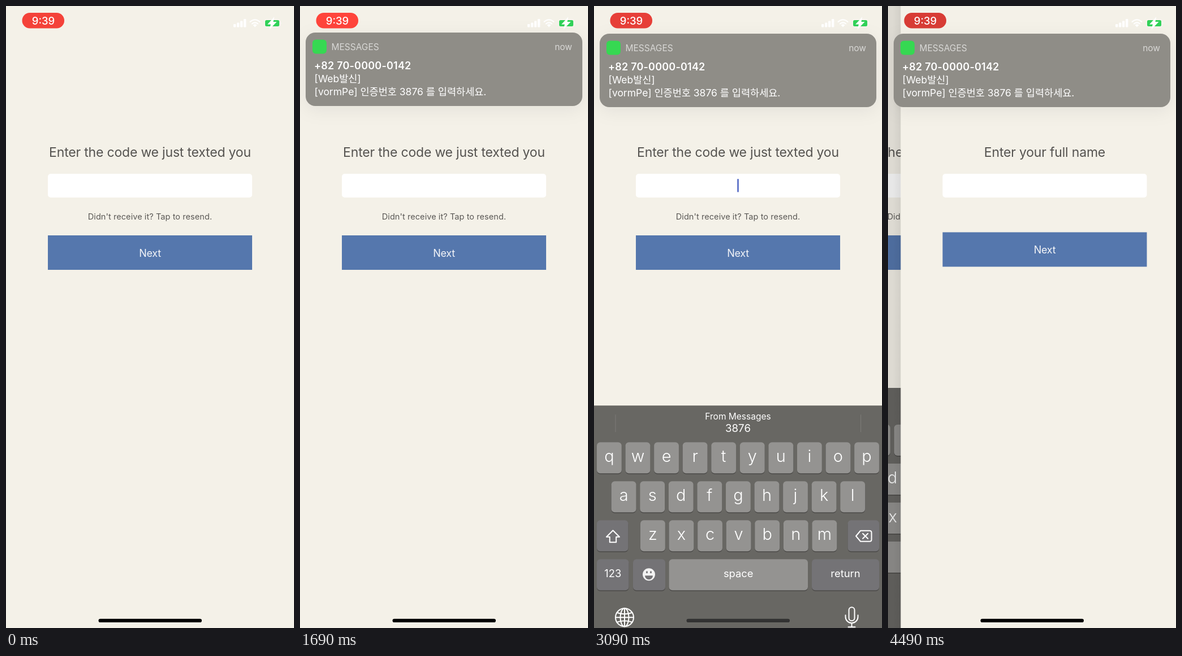
Recreate the animation shown at these times as an HTML page. Size 509x1101 px, loop 4590 ms.

```html
<!DOCTYPE html>
<html lang="en">
<head>
<meta charset="utf-8">
<title>Code entry</title>
<style>
  html, body { margin: 0; width: 100%; height: 100%; overflow: hidden; background: #f4f1e8; }
  svg { display: block; width: 100vw; height: 100vh; }
  text {
    font-family: Inter, "Noto Sans CJK KR", "Noto Sans CJK", sans-serif;
    font-optical-sizing: none;
    fill: #fff;
    white-space: pre;
  }
  .mid { text-anchor: middle; }
  .title { font-size: 23px; letter-spacing: -.19px; fill: #555350; }
  .hint { font-size: 14.5px; letter-spacing: .08px; fill: #5a5855; }
  .button { font-size: 18px; letter-spacing: -.3px; fill: #f4f5f8; }
  .small { font-size: 15.5px; }
  .label { font-size: 18.4px; }
  .letter { font-size: 29px; font-weight: 300; }
  .line { fill: none; stroke: #fff; stroke-width: 2; stroke-linejoin: round; stroke-linecap: round; }
</style>
</head>
<body>
<svg viewBox="0 0 509 1101">
  <defs>
    <filter id="soft" x="-15%" y="-50%" width="130%" height="200%">
      <feDropShadow dx="0" dy="7" stdDeviation="15" flood-color="#000" flood-opacity=".065"/>
    </filter>
    <linearGradient id="edge">
      <stop offset="0" stop-opacity="0"/>
      <stop offset="1" stop-opacity=".05"/>
    </linearGradient>
  </defs>

  <g id="codePage">
    <rect width="509" height="1101" fill="#f4f1e8"/>
    <g id="codeForm"></g>
    <text id="code" class="title mid" x="254.5" y="326">3876</text>
    <rect id="caret" y="306" width="2.6" height="23.5" rx="1" fill="#5268c4"/>
    <g id="keyboard">
      <rect width="509" height="430" fill="#686763"/>
      <g id="suggestion">
        <path id="dividers" d="M38 16v31M471.5 16v31" stroke="#7c7b78"/>
        <rect id="pressed" x="37" y="7" width="435.5" height="48" rx="6" fill="#747376"/>
        <text class="small mid" x="254.5" y="25">From Messages</text>
        <text class="mid" x="254.5" y="47" font-size="18.7">3876</text>
      </g>
      <g id="keys"></g>
      <path class="line" d="M33.5 221l11.5 11.5h-5.800v9.500h-11.400v-9.500h-5.800z"/>
      <path class="line" d="M471 221.5h16q3.500 0 3.500 3.500v12q0 3.500-3.500 3.500h-16l-8-9.500zM475 226.500l9 9m0-9l-9 9"/>
      <circle cx="97" cy="299" r="11" fill="#f2f2f2"/>
      <path d="M90 301h14a7 7 0 0 1-14 0zM92 295a1.500 2 0 1 1 3 0a1.500 2 0 1 1-3 0M99 295a1.500 2 0 1 1 3 0a1.500 2 0 1 1-3 0" fill="#747376"/>
      <g class="line" transform="translate(54 375)">
        <circle r="16"/>
        <ellipse rx="7.5" ry="16"/>
        <path d="M0-16v32M-16 0h32M-13.5-8.500q13.500 5 27 0M-13.500 8.500q13.500-5 27 0"/>
      </g>
      <g class="line" transform="translate(455.5 374)">
        <rect x="-5" y="-17" width="10" height="24" rx="5"/>
        <path d="M-11-3v3a11 11 0 0 0 22 0v-3M0 11v7M-6 18h12"/>
      </g>
    </g>
    <rect id="dim" width="509" height="1101"/>
  </g>

  <g id="namePage">
    <rect x="-14" width="14" height="1101" fill="url(#edge)"/>
    <rect width="509" height="1101" fill="#f4f1e8"/>
    <g id="nameForm"></g>
  </g>

  <g id="status">
    <rect id="pill" x="28.5" y="12" width="74.5" height="27.5" rx="13.5"/>
    <text class="mid" x="66" y="33" font-size="18.5" font-weight="500">9:39</text>
    <g fill="#fff">
      <rect x="402" y="32" width="4.4" height="5.5" rx="1"/>
      <rect x="408" y="29.5" width="4.4" height="8" rx="1"/>
      <rect x="414" y="26.5" width="4.4" height="11" rx="1"/>
      <rect x="420" y="23" width="4.4" height="14.5" rx="1"/>
      <path d="M440 37.5l-3.500-3.800q3.500-2.800 7 0z"/>
    </g>
    <path class="line" d="M431.5 28q8.500-7.500 17 0M434.800 31.500q5.200-4.300 10.400 0"/>
    <rect x="456.5" y="23.5" width="28" height="13.5" rx="4" fill="none" stroke="#fff" opacity=".4"/>
    <rect x="458" y="25" width="25" height="11" rx="2.5" fill="#30d158"/>
    <path d="M472 23.5l-7 7.800h4.500l-1.500 6l7.500-8h-4.700z" fill="#fff" stroke="#fff" stroke-width="2.6"/>
    <path d="M486 28v5q2-2.500 0-5" fill="#fff" opacity=".5"/>
  </g>

  <g id="card">
    <rect x="10" width="489" height="130" rx="17" fill="#8f8d87" filter="url(#soft)"/>
    <rect x="22" y="12.5" width="25" height="25" rx="6" fill="#36d852"/>
    <g fill-opacity=".66">
      <text class="small" x="55.5" y="31">MESSAGES</text>
      <text class="small" x="481" y="31" text-anchor="end">now</text>
    </g>
    <text x="25" y="65" font-size="18" font-weight="600" letter-spacing=".2">+82 70-0000-0142</text>
    <text x="25.5" y="88" font-size="17.5">[Web발신]</text>
    <text x="25.5" y="110.5" font-size="17.5">[vormPe] 인증번호 3876 를 입력하세요.</text>
  </g>
  <rect id="home" x="163.5" y="1084.7" width="182.5" height="6.3" rx="3.1"/>
</svg>

<script>
const LOOP = 4590, TICK = 100, LAST = 45;
const WIDTH = 509, HEIGHT = 1101, KEYBOARD_TOP = 676;
const $ = id => document.getElementById(id);
const set = (id, name, value) => $(id).setAttribute(name, value);
const show = (id, on) => set(id, "display", on ? "inline" : "none");
const move = (id, x, y) => set(id, "transform", `translate(${x.toFixed(2)} ${y.toFixed(2)})`);

function form(title, hint, buttonY) {
  return `<text class="title mid" x="254.5" y="266.5">${title}</text>
    <rect x="74" y="297" width="361" height="42" rx="5" fill="#fff"/>
    <text class="hint mid" x="254.5" y="378">${hint}</text>
    <rect x="74" y="${buttonY}" width="361" height="61" fill="#5577ad"/>
    <text class="button mid" x="254.5" y="${buttonY + 37.5}">Next</text>`;
}

function key(x, row, width, label = "", dark = false) {
  const y = 65 + row * 69, single = label.length === 1;
  const box = (dy, fill) =>
    `<rect x="${x}" y="${y + dy}" width="${width}" height="55" rx="6" fill="${fill}"/>`;
  return box(1.5, "#4b4a48") + box(0, dark ? "#747376" : "#949391") +
    `<text class="${single ? "letter" : "label"} mid" x="${x + width / 2}" y="${y + (single ? 35 : 32)}">${label}</text>`;
}

function buildKeys() {
  const rows = [["qwertyuiop", 5], ["asdfghjkl", 30.7], ["zxcvbnm", 82]];
  const letters = rows.flatMap(([chars, x], row) =>
    [...chars].map((c, i) => key(x + i * 50.57, row, 43.8, c)));
  return letters.join("") +
    key(5, 2, 55.5, "", true) + key(448.5, 2, 55.5, "", true) +
    key(5, 3, 56.5, "123", true) + key(69, 3, 57, "", true) +
    key(132.5, 3, 245.5, "space") + key(385, 3, 119, "return", true);
}

// Share of the distance left for a critically damped spring.
function remaining(tick, start, rate) {
  const x = Math.max(0, tick - start) * rate;
  return (1 + x) * Math.exp(-x);
}

function draw(ms) {
  const tick = Math.min(LAST, Math.floor((ms + 30) / TICK));

  const glow = (1 + Math.cos((tick - 36.5) * Math.PI / 10)) / 2;
  const mix = (low, high) => Math.round(low + (high - low) * glow);
  set("pill", "fill", `rgb(${mix(214, 255)},${mix(60, 68)},${mix(53, 59)})`);

  const drop = remaining(tick, 11.52, 1.21);
  show("card", drop < 1);
  move("card", 0, 49 - 199 * drop);

  const rise = remaining(tick, 28.66, 1.826);
  show("keyboard", rise < 1);
  move("keyboard", 0, KEYBOARD_TOP + (HEIGHT - KEYBOARD_TOP) * rise);

  const pressed = tick === 36, filled = tick > 36;
  show("pressed", pressed);
  show("dividers", !pressed);
  show("suggestion", !filled);
  show("code", filled);
  const blinkStart = filled ? 37 : 29;
  show("caret", tick >= blinkStart && (tick - blinkStart) % 10 < 5);
  set("caret", "x", filled ? 283 : 253.2);

  const push = remaining(tick, 42.32, 1.826);
  show("namePage", push < 1);
  move("namePage", WIDTH * push, 0);
  move("codePage", -WIDTH * 0.3 * (1 - push), 0);
  set("dim", "opacity", 0.1 * (1 - push));

  const overKeys = rise < 0.1 && push > 0.5;
  set("home", "fill", overKeys ? "#323232" : "#000");
}

$("codeForm").innerHTML = form("Enter the code we just texted you", "Didn't receive it? Tap to resend.", 406);
$("nameForm").innerHTML = form("Enter your full name", "", 400.5);
$("keys").innerHTML = buildKeys();

const began = performance.now();
function loop() {
  draw((performance.now() - began) % LOOP);
  requestAnimationFrame(loop);
}
loop();
</script>
</body>
</html>
```
